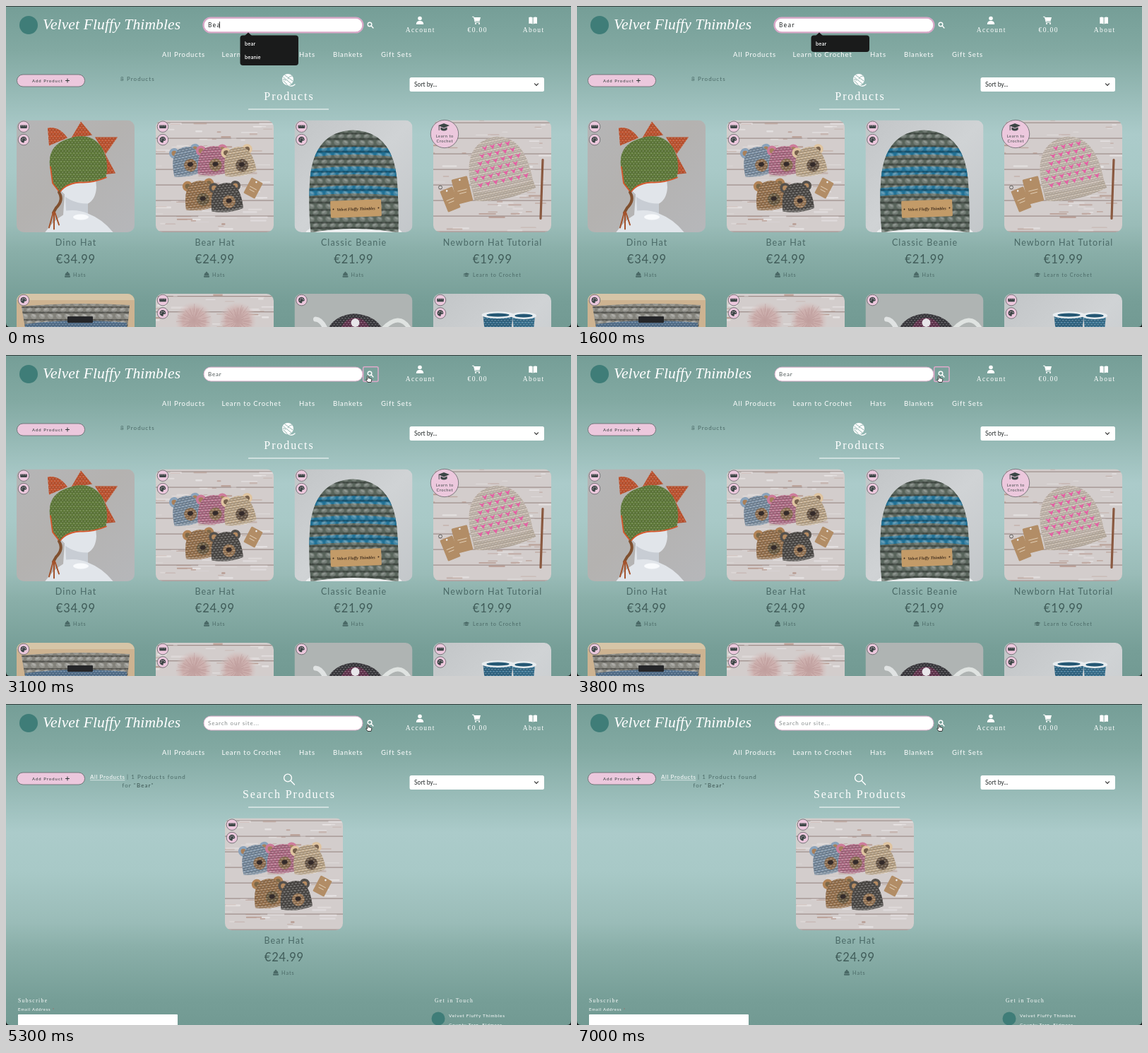
An HTML page for the animation above (7100 ms loop, 800 by 454 pixels).

```html
<!DOCTYPE html>
<html lang="en">
<head>
<meta charset="utf-8">
<title>Shop search</title>
<style>
  html, body { margin: 0; width: 100%; height: 100%; overflow: hidden; background: #7aa39c; }
  svg { display: block; width: 100vw; height: 100vh; }
  text { white-space: pre; }
  .sans { font-family: Lato, "Open Sans", sans-serif; }
  .slab { font-family: "Liberation Serif", serif; }
  .script { font-family: "Liberation Serif", serif; font-style: italic; }
  .input { font-family: "Noto Sans", sans-serif; }
  .system { font-family: Inter, sans-serif; font-weight: 500; }
</style>
</head>
<body>
<svg id="stage" viewBox="0 0 800 454" preserveAspectRatio="none"></svg>
<script>
const LOOP = 7100, TYPED = 400, ENTER = 2100, GLIDE = 800, CLICK = 3000, RESULT = 5100;
const BRAND = 'Velvet Fluffy Thimbles';
const INK = '#4a6966', DARK = '#3c4646', PINK = '#ecc8dd', TEAL = '#3f7d78';

let seed = 7;
const rnd = () => (seed = (seed * 16807) % 2147483647) / 2147483647;
const times = (n, fn) => Array.from({ length: n }, (_, i) => fn(i)).join('');

const text = (x, y, str, size, o = {}) => {
  const { c = 'sans', fill = '#fff', ls = 0, mid = false, more = '' } = o;
  return `<text class="${c}" x="${mid ? x + ls / 2 : x}" y="${y}" font-size="${size}" fill="${fill}"
    letter-spacing="${ls}" ${mid ? 'text-anchor="middle"' : ''} ${more}>${str}</text>`;
};
const rect = (x, y, w, h, fill, r = 0, more = '') =>
  `<rect x="${x}" y="${y}" width="${w}" height="${h}" rx="${r}" fill="${fill}" ${more}/>`;
const circle = (x, y, r, fill, more = '') => `<circle cx="${x}" cy="${y}" r="${r}" fill="${fill}" ${more}/>`;
const oval = (x, y, rx, ry, fill, more = '') =>
  `<ellipse cx="${x}" cy="${y}" rx="${rx}" ry="${ry}" fill="${fill}" ${more}/>`;
const path = (d, fill, more = '') => `<path d="${d}" fill="${fill}" ${more}/>`;
const line = (d, color, w, more = '') =>
  path(d, 'none', `stroke="${color}" stroke-width="${w}" stroke-linecap="round" stroke-linejoin="round" ${more}`);
const group = (tf, body, more = '') => `<g transform="${tf}" ${more}>${body}</g>`;
const knit = (d, fill, p = 'knit') => path(d, fill) + path(d, `url(#${p})`);

// one puffy stitch in a dark gap, the next row shifted by half
const yarn = (id, w, h) => {
  const puff = (x, y, turn) => group(`translate(${x} ${y}) rotate(${turn})`,
    oval(0, 0, w * .36, h * .2, '#fff', 'opacity=".17"') + oval(0, -h * .06, w * .22, h * .07, '#fff', 'opacity=".22"'));
  return `<pattern id="${id}" width="${w}" height="${h}" patternUnits="userSpaceOnUse">
    ${rect(0, 0, w, h, '#000', 0, 'opacity=".14"')}
    ${line(`M0 0Q${w / 2} ${h * .16} ${w} 0M0 ${h / 2}Q${w / 2} ${h * .4} ${w} ${h / 2}`, '#000', h * .13, 'opacity=".35"')}
    ${puff(w * .5, h * .26, -25)}${puff(0, h * .76, 25)}${puff(w, h * .76, 25)}</pattern>`;
};
const stops = list => list.map(([at, col]) => `<stop offset="${at}" stop-color="${col}"/>`).join('');

const hat = 'M23 159Q19 120 22 82Q28 16 83 14Q138 16 145 82Q148 120 147 159Q84 148 23 159Z';
const defs = `<defs>
  <linearGradient id="bg" x2="0" y2="1">${stops([[0, '#759e97'], [.14, '#82a9a2'], [.4, '#abcbca'],
    [.52, '#a8c9c7'], [.68, '#9abcb8'], [.76, '#8aafa9'], [.92, '#769e97'], [1, '#729a93']])}</linearGradient>
  <linearGradient id="wall" x2="1" y2="1">${stops([[0, '#b5b5b6'], [.45, '#b4b2b0'], [1, '#b6b7ba']])}</linearGradient>
  <linearGradient id="pale" x2="1" y2="1">${stops([[0, '#c2c5c7'], [.5, '#d0d3d5'], [1, '#c3c7ca']])}</linearGradient>
  <radialGradient id="fluff">${stops([[0, '#c09e9d'], [.6, '#cbaeac']])}
    <stop offset="1" stop-color="#d6c2c0" stop-opacity="0"/></radialGradient>
  <clipPath id="frame"><rect width="167" height="158.5" rx="10"/></clipPath>
  <clipPath id="dome"><path d="${hat}"/></clipPath>
  ${yarn('knit', 4.5, 6)}${yarn('chunky', 12, 18)}</defs>`;

/* photographs, each in a 167 x 158 box */
const back = fill => rect(0, 0, 167, 159, fill);
const wood = () => back('#d3cdcc') +
  times(8, i => rect(0, i * 22 + 3, 167, 1.2, '#8d7974', 0, 'opacity=".75"')) +
  times(80, () => rect(rnd() * 165 - 12, rnd() * 158, 5 + rnd() * 20, .6 + rnd() * 2.2,
    rnd() < .5 ? '#a88072' : '#f1eff0', 1, `opacity="${(.25 + rnd() * .4).toFixed(2)}"`));

const spikes = 'M46 36L44 11Q60 8 72 25ZM77 26L91 2L107 21ZM111 24L143 24L126 48ZM125 47L140 75L122 77Z';
const dinoPhoto = () => back('url(#wall)') +
  path('M40 159Q52 142 66 134L68 105L55 92L58 60L110 60L113 95Q112 112 101 118L101 132Q122 140 137 159Z', '#e1e5ea') +
  path('M58 96Q72 118 101 118L101 132Q88 126 70 128L69 108Z', '#c8cdd4') +
  oval(91, 137, 11, 4, '#f8fafc') + knit(spikes, '#e2582a') +
  knit('M47 64Q44 35 74 26Q104 15 121 39Q132 60 126 82Q108 88 90 87Q70 88 61 102L52 91Z', '#688a38') +
  line('M127 81Q108 89 90 88Q70 89 61 102L51 89L48 66', '#d4562a', 1.8) +
  line('M60 102Q67 113 56 124L52 131', '#80502f', 4) + line('M52 130L46 152M53 130L53 154M54 130L60 148', '#a3532c', 2);

const bear = (x, y, turn, col, nose) => group(`translate(${x} ${y}) rotate(${turn}) scale(1.12)`,
  [-14, 13].map(e => circle(e, -15, 6.5, col) + circle(e, -15, 3.2, nose)).join('') +
  knit('M-20 14Q-20 -20 0 -20Q20 -20 20 14Q0 20 -20 14Z', col) +
  line('M-19 13Q0 18 19 13', '#fff', 2, 'opacity=".2"') +
  circle(3, 4, 8, nose) + circle(3, 4, 8, 'url(#knit)') + oval(3, 3, 3.6, 2.8, '#342b2a'));
const tag = (x, y, turn, w, h) => group(`translate(${x} ${y}) rotate(${turn})`,
  rect(-w / 2, -h / 2, w, h, '#b28d66', 1.5) + circle(0, -h / 2 + 3, 1.3, '#eee') +
  line(`M${-w * .28} 0H${w * .28}M${-w * .2} 4H${w * .2}`, '#e8d9c3', .8));
const bearPhoto = () => wood() +
  bear(45, 60, -12, '#8ba3bb', '#a9805a') + bear(81, 59, -4, '#cd7b9a', '#a4815d') +
  bear(118, 60, -10, '#dfc4a0', '#76604d') + bear(63, 108, -8, '#b18356', '#7b6748') +
  bear(100, 111, -6, '#55514d', '#b58a60') + tag(138, 96, 28, 18, 25);

const beaniePhoto = () => back('url(#pale)') + oval(84, 159, 68, 13, '#eceeef') + path(hat, '#67746a') +
  `<g stroke="#2583ae" stroke-width="11" fill="none" clip-path="url(#dome)">` +
  [48, 76, 103].map(y => `<path d="M10 ${y}Q84 ${y - 10} 158 ${y}"/>`).join('') +
  '</g>' + path(hat, 'url(#chunky)') +
  group('translate(87 125) rotate(-2)', rect(-36, -12, 72, 24, '#c39b68', 1.5) +
    text(0, 2.5, BRAND, 5.8, { c: 'script', fill: '#3d2b1c', mid: true, more: 'font-weight="700"' }) +
    circle(-32, 0, 1, '#3d2b1c') + circle(32, 0, 1, '#3d2b1c'));

const newbornPhoto = () => wood() +
  group('translate(92 66) rotate(-12)', knit('M-43 30Q-48 -40 0 -43Q46 -40 44 30Q0 40 -43 30Z', '#e9dacd') +
    times(6, r => times(7, i => {
      const x = -35 + i * 11 + (r % 2) * 5, y = -30 + r * 10;
      return Math.abs(x) < 24 + r * 4 ? path(`M${x - 4} ${y - 3}L${x} ${y + 4}L${x + 4} ${y - 3}L${x} ${y - 1}Z`, '#e55fa4') : '';
    })) + knit('M-43 28Q0 38 44 28L46 40Q0 52 -43 40Z', '#e0d1c0')) +
  tag(41, 99, -14, 23, 36) + tag(24, 112, -22, 19, 32) +
  line('M155 56L152 139', '#8a5940', 3.2) + circle(10, 95, 2.5, 'none', 'stroke="#60615f"');

const cowlPhoto = () => back('#cdb391') + rect(0, 0, 167, 9, '#d6c5a7') +
  knit('M7 18Q80 11 160 16L156 60H14Z', '#98978f', 'chunky') +
  knit('M12 43Q80 34 156 41V60H12Z', '#5a7fa3') + rect(72, 32, 36, 9, '#252629', 1);
const puff = (x, y) => circle(x, y, 27, 'url(#fluff)') + times(46, i => {
  const a = i * .83, r = 16 + rnd() * 9, at = k => `${(x + k * Math.cos(a)).toFixed(1)} ${(y + k * Math.sin(a)).toFixed(1)}`;
  return line(`M${at(r - 11)}L${at(r)}`, i % 2 ? '#dbc0be' : '#b69492', .7, 'opacity=".6"');
});
const pomPhoto = () => wood() + puff(54, 38) + puff(116, 38);
const potPhoto = () => back('#afb4b3') +
  line('M30 36Q40 36 48 60', '#e0e3e3', 7) + line('M125 50Q148 26 162 48', '#dfe3e1', 6) +
  knit('M44 60Q50 31 85 28Q121 31 129 60Z', '#3a393f') + knit('M63 60Q66 35 86 34Q106 35 110 60Z', '#6d3354') +
  circle(86, 41, 6, '#e7e5e9');
const boot = (x, y, r, fill) => knit(`M${x - r + 2} ${y}H${x + r - 2}L${x + r - 5} 60H${x - r + 5}Z`, fill) +
  oval(x, y, r, 5, '#e8edf0') + oval(x, y, r * .7, 2.5, '#245774');
const bootPhoto = () => back('url(#pale)') + boot(91.5, 30, 23, '#2f739a') + boot(128, 31, 18, '#3880a6');

/* icons */
const ring = 'stroke="#626468" stroke-width=".8"';
const ruler = (x, y) => circle(x, y, 7.8, PINK, ring) + rect(x - 4.8, y - 2.2, 9.6, 4.4, DARK, .8) +
  line(`M${x - 2.6} ${y - 1.8}v1M${x} ${y - 1.8}v1M${x + 2.6} ${y - 1.8}v1`, PINK, .5);
const palette = (x, y) => circle(x, y, 7.8, PINK, ring) +
  path(`M${x} ${y - 4.3}a4.3 4.3 0 0 1 4.3 4.3q0 1.6-2.2 1.4q-2-.1-1.4 1.5q.5 1.6-1 1.4a4.3 4.3 0 0 1 .3-8.6Z`, DARK) +
  [[-2.3, .2], [-1.3, -2], [1, -2.3], [2.5, -.8]].map(([a, b]) => circle(x + a, y + b, .65, PINK)).join('');
const cap = (x, y, s, fill) => group(`translate(${x} ${y}) scale(${s})`,
  path('M-8 -2L0 -5L8 -2L0 1.4Z M-4.6 .6L0 2.6L4.6 .6V4Q0 7 -4.6 4Z', fill) + line('M-6.8 -1.4V4.5', fill, 1));
const glass = (x, y, r, w) => circle(x, y, r, 'none', `stroke="#fff" stroke-width="${w}"`) +
  line(`M${x + r * .75} ${y + r * .75}L${x + r * 1.75} ${y + r * 1.75}`, '#fff', w);
const beanieIcon = (x, y) => path(`M${x - 3.4} ${y + 1}q0-4 3.4-4q3.4 0 3.4 4Z`, INK) +
  rect(x - 4, y + 1.4, 8, 2.4, INK, .8) + circle(x, y - 3.2, 1.1, INK);
const yarnIcon = circle(399, 104, 8, '#fff') + line('M400 112Q405 115 409 111', '#fff', 1.3) +
  line('M393 101L404 110M395 98L406 106M393 106L398 111M399 103Q401 99 405 99M396 105Q393 103 392 104', '#84aaa4', .9);

/* page parts */
const photo = (x, y, art) => group(`translate(${x} ${y})`, art, 'clip-path="url(#frame)"');
const card = (x, art, title, price, kind = 'Hats') => {
  const c = x + 83.5, hats = kind === 'Hats';
  return photo(x, 161.5, art) +
    text(c, 338.5, title, 12.5, { fill: INK, ls: 1.1, mid: true }) +
    text(c, 364, price, 16.5, { fill: '#405c59', ls: .7, mid: true }) +
    (hats ? beanieIcon(c - 11.5, 380) : cap(c - 36.5, 380, .55, INK)) +
    text(c - (hats ? 3.5 : 27.5), 383, kind, 7.2, { fill: INK, ls: 1 });
};
const badges = (x, y) => ruler(x, y) + palette(x, y + 18.4);
const nav = { ls: .9 }, slab = { c: 'slab', ls: 1.4, mid: true };
const heading = str => text(400, 133, str, 16, { c: 'slab', ls: 1.9, mid: true });
const menu = [[221, 'All Products'], [305.5, 'Learn to Crochet'], [415, 'Hats'], [463, 'Blankets'], [531, 'Gift Sets']];

const header = rect(0, 0, 800, 454, 'url(#bg)') +
  circle(32, 27, 13, TEAL) + text(52, 33, BRAND, 21.6, { c: 'script', ls: .1 }) +
  circle(586, 17.5, 2.8, '#fff') + path('M580.8 26Q580.8 21 586 21Q591.2 21 591.2 26Z', '#fff') +
  path('M662.5 16H672L670.5 21.5H664Z', '#fff') + line('M660.5 15.3H662.3L664.3 23H670.5', '#fff', 1) +
  circle(665, 25, 1.1, '#fff') + circle(670, 25, 1.1, '#fff') +
  path('M740.3 16Q743.5 15 745.6 16.3V25.5Q743 24.2 740.3 25ZM752 16Q748.8 15 746.6 16.3V25.5Q749.3 24.2 752 25Z', '#fff') +
  text(586, 36.7, 'Account', 9.5, slab) + text(667, 36.7, '€0.00', 9.5, slab) + text(746.5, 36.7, 'About', 9.5, slab) +
  menu.map(([x, s]) => text(x, 72, s, 9.5, nav)).join('') +
  rect(15.5, 97, 96, 17, PINK, 8.5, ring) + text(37, 107.8, 'Add Product', 6, { fill: '#2f3838', ls: 1 }) +
  line('M84.5 105.5H89.5M87 103V108', '#2f3838', 1) +
  rect(571.5, 101, 190.5, 20, '#fff', 2.5) + text(578, 114, 'Sort by...', 8.5, { fill: '#202626' }) +
  line('M748.5 109.8L751 112.4L753.5 109.8', '#333', 1.2) + line('M343.5 146H456.5', '#fff', 1.2);

const home = yarnIcon + heading('Products') +
  text(162, 106, '8 Products', 8, { fill: INK, ls: 1.1 }) +
  card(15, dinoPhoto(), 'Dino Hat', '€34.99') + card(212, bearPhoto(), 'Bear Hat', '€24.99') +
  card(408.5, beaniePhoto(), 'Classic Beanie', '€21.99') +
  card(605, newbornPhoto(), 'Newborn Hat Tutorial', '€19.99', 'Learn to Crochet') +
  [25, 222, 418.5].map(x => badges(x, 170.7)).join('') +
  circle(621, 181, 19.7, PINK, ring) + cap(620, 171, 1, DARK) +
  text(621, 186, 'Learn to', 5.6, { fill: DARK, ls: .6, mid: true }) +
  text(621, 193, 'Crochet', 5.6, { fill: DARK, ls: .6, mid: true }) +
  photo(15, 407, cowlPhoto()) + photo(212, 407, pomPhoto()) + photo(408.5, 407, potPhoto()) + photo(605, 407, bootPhoto()) +
  palette(25, 416) + badges(222, 416) + palette(418.5, 416) + badges(615, 416);

seed = 7;
const found = glass(399, 104.5, 5.4, 1.4) + heading('Search Products') +
  text(119, 106, 'All Products', 8, { ls: .6 }) + line('M119.5 107.7H168', '#fff', .6) +
  text(171, 106, '| 1 Products found', 8, { fill: INK, ls: 1.07 }) +
  text(186.5, 118.3, 'for "<tspan fill="#38504d">Bear</tspan>"', 8, { fill: INK, ls: 1.1, mid: true }) +
  card(310, bearPhoto(), 'Bear Hat', '€24.99') + badges(320, 170.7) +
  text(17, 422, 'Subscribe', 7.6, { c: 'slab', ls: 1.4 }) +
  text(17, 434, 'Email Address <tspan fill="#a5645f">*</tspan>', 6, { ls: .75 }) + rect(17, 439, 226, 20, '#fff', 1) +
  text(607, 422, 'Get in Touch', 7.6, { c: 'slab', ls: 1.3 }) + circle(612, 445, 9.5, TEAL) +
  text(627, 443, BRAND, 6.5, { ls: .75 }) + text(627, 456, 'County Tarn, Eldmere', 6.5, { ls: .75 });

const popup = `<g id="popup">${path('M338 42L343 37.5L348 42Z', '#1a1b1b')}
  <rect id="list" x="331.5" y="41.5" width="82.5" height="42.5" rx="4" fill="#1a1b1b"/>
  ${text(338, 56, 'bear', 7, { c: 'system' })}
  <g id="second">${text(338, 75, 'beanie', 7, { c: 'system' })}</g></g>`;
const arrow = path('M0 0V9.2L2.2 7.3L3.7 10.4L5.2 9.7L3.8 6.7H6.6Z', '#111', 'stroke="#fff" stroke-width=".7"');
const hand = path('M-.9 .8Q0 -.3 .9 .8V4Q2 3.2 2.6 4.2Q3.6 3.5 4.1 4.6Q5 4.2 5.2 5.3V7L4.3 9.5H-.4L-2.8 6Q-2.6 4.6 -.9 5.8Z',
  '#fff', 'stroke="#111" stroke-width=".8"');

document.getElementById('stage').innerHTML = defs + header +
  `<g id="home">${home}</g><g id="found">${found}</g>` +
  rect(280, 17.2, 225, 19.8, '#fff', 9.9, 'stroke="#dcb0cb" stroke-width="1"') +
  `<g id="glow">${rect(279.5, 16.5, 226, 21, 'none', 10.5, 'stroke="#d9a8c8" stroke-width="2.2"')}</g>` +
  `<g id="live">${text(286, 30, '<tspan id="query"></tspan>', 8.3, { c: 'input', fill: '#1d2222', ls: 1.2 })}</g>
   <g id="sent">${text(286, 30, 'Bear', 8, { fill: '#4c5555', ls: .85 })}</g>
   <g id="hint">${text(286, 30, 'Search our site...', 8, { fill: '#858b8b', ls: .85 })}</g>
   <g id="caret">${rect(302.2, 22, .8, 9.5, '#222')}</g>` +
  glass(515, 26, 2.8, 1.4) +
  `<g id="focus">${rect(505.7, 16.7, 21.3, 20.8, 'none', 2, 'stroke="#dda9ca" stroke-width="1.5"')}</g>` + popup +
  `<g id="mouse"><g id="arrow">${arrow}</g><g id="hand">${hand}</g></g>` +
  rect(0, 0, 800, 1, '#34403e') + path('M0 448Q0 454 6 454H0ZM800 448Q800 454 794 454H800Z', '#141818');

const $ = id => document.getElementById(id);
const show = (id, on) => $(id).setAttribute('display', on ? 'inline' : 'none');

function draw(ms) {
  const t = Math.floor((ms % LOOP) / 100) * 100;
  const typing = t < CLICK, listed = t >= RESULT, typed = t >= TYPED;
  show('home', !listed);
  show('found', listed);
  show('live', typing);
  show('glow', typing);
  show('popup', typing);
  show('sent', !typing && !listed);
  show('focus', !typing && !listed);
  show('hint', listed);
  show('caret', !typed);
  show('second', !typed);
  $('query').textContent = typed ? 'Bear' : 'Bea';
  $('list').setAttribute('height', typed ? 23.5 : 42.5);

  const p = Math.min(1, Math.max(0, (t - ENTER) / GLIDE)), e = p * p * (3 - 2 * p);
  const x = 529 - 16.5 * e, y = -6 + 35 * e, over = x < 527 && y > 16;
  $('mouse').setAttribute('transform', `translate(${x} ${y})`);
  show('mouse', t >= ENTER);
  show('arrow', !over);
  show('hand', over);
}

const start = performance.now();
function tick() {
  draw(performance.now() - start);
  requestAnimationFrame(tick);
}
tick();
</script>
</body>
</html>
```
